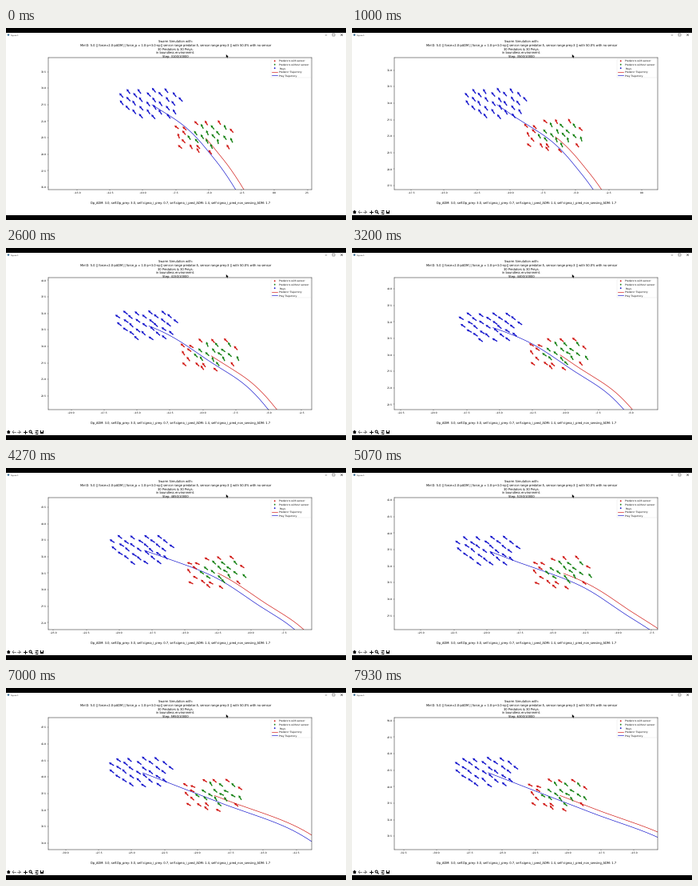
These frames come from a looping animation (426 by 240 pixels, 8000 ms). A matplotlib script:

```python
import numpy as np
import matplotlib.pyplot as plt
from matplotlib.animation import FuncAnimation
from matplotlib.patches import Circle, Polygon, Rectangle
from matplotlib.ticker import MultipleLocator

W, H, DPI = 426, 240, 96
PT = 72 / DPI                      # points per pixel
FRAMES, LOOP = 120, 8000
LAST = 64                          # simulation ticks in one loop
LAG, SIDE = 18.5, 0.6              # predators trail behind and to the right
START = -53
RED, GREEN, BLUE = "#d01410", "#128010", "#1212cc"

plt.rcParams["font.family"] = "DejaVu Sans"
plt.rcParams["text.hinting"] = "none"
rng = np.random.default_rng(7)

# Path of the prey centre: tick, x, y
TRACK = np.array([
    (START, -1.7, 10.6), (-28, -4.5, 19.1), (-10.5, -7.06, 24.57),
    (0, -9.3, 27.48), (16, -12.79, 31.93), (35, -18.09, 35.95),
    (LAST, -26.08, 42.12)])


def prey_at(k):
    """Smooth (Hermite) position along the track at ticks k."""
    t, p = TRACK[:, 0], TRACK[:, 1:]
    m = np.gradient(p, t, axis=0)
    i = np.clip(np.searchsorted(t, k, "right") - 1, 0, len(t) - 2)
    h = (t[i + 1] - t[i])[:, None]
    u = (k - t[i])[:, None] / h
    return ((2*u**3 - 3*u**2 + 1) * p[i] + (u**3 - 2*u**2 + u) * h * m[i]
            + (3*u**2 - 2*u**3) * p[i + 1] + (u**3 - u**2) * h * m[i + 1])


def course(k):
    d = prey_at(k + 0.5) - prey_at(k - 0.5)
    return np.arctan2(d[:, 1], d[:, 0])


def pred_at(k):
    a = course(k - LAG)
    return prey_at(k - LAG) + SIDE * np.column_stack([np.sin(a), -np.cos(a)])


def view_centre(k):
    x = -7.18 - 0.212*k - 0.0006*k**2 + 0.18*np.sin(2*np.pi*k/LAST)
    y = 24.63 + 0.289*k - 0.00065*k**2
    return x, y


def swarm(dx, dy, noise):
    """Thirty places of a hexagonal lattice, centred, slightly uneven."""
    grid = np.array([(dx * (c + 0.5 * (r % 2)), dy * r)
                     for r in range(-4, 5) for c in range(-4, 5)])
    near = grid[np.argsort(np.hypot(grid[:, 0] - 0.1, grid[:, 1] - 0.1))[:30]]
    return near - near.mean(axis=0) + rng.normal(0, noise, near.shape)


fig = plt.figure(figsize=(W / DPI, H / DPI), dpi=DPI, facecolor="white")


def layer():
    a = fig.add_axes([0, 0, 1, 1], xlim=(0, W), ylim=(H, 0))
    a.axis("off")
    return a


win = layer()


def label(x, y, s, size, ha="center", ax=win):
    return ax.text(x, y, s, fontsize=size * PT, ha=ha, va="baseline")


def stroke(xs, ys, lw=0.6, color="black", ax=win):
    return ax.plot(xs, ys, color=color, lw=lw * PT)[0]


def fill(shape, color="black", ax=win):
    shape.set(facecolor=color, linewidth=0)
    return ax.add_patch(shape)


# ---- window ----
for y in (0, 234):
    fill(Rectangle((0, y), W, 6))
fill(Circle((3, 8.6), 1.3), "#4a7a9c")
label(5.5, 9.6, "Figure 1", 2.4, "left")
stroke([399.5, 402], [8.6, 8.6], 0.4)
stroke([409.4, 411.8, 411.8, 409.4, 409.4], [7.4, 7.4, 9.8, 9.8, 7.4], 0.35)
stroke([419.4, 421.8], [7.4, 9.8], 0.4)
stroke([419.4, 421.8], [9.8, 7.4], 0.4)

TITLE = [
    "Swarm Simulation with:",
    "MinID: 5.0 || force=2.0-pADM || force_p = 1.0-p+3.0-np|| "
    "sensor range predator:5, sensor range prey:3 || "
    "with 50.0% with no sensor",
    "30 Predators & 30 Preys.",
    "in boundless environment.",
    "",
]
lines = [label(212.5, 18 + 4.7 * i, s, 3.67) for i, s in enumerate(TITLE)]
step_text = lines[-1]
label(219, 219.4,
      "Dp_ADM: 3.0, self.Dp_prey: 3.0, self.sigma_i_prey: 0.7, "
      "self.sigma_i_pred_ADM: 1.4, self.sigma_i_pred_non_sensing_ADM: 1.7",
      3.67)


def toolbar():
    y = 230
    parts = [fill(Polygon([(0.8, y), (3.2, y - 2.4), (5.6, y), (4.8, y),
                           (4.8, y + 2), (1.6, y + 2), (1.6, y)]))]
    for x, d in ((10, -1), (16, 1)):
        parts.append(stroke([x - 2, x + 2], [y, y], 0.8, "#666666"))
        parts.append(stroke([x + d * 0.4, x + d * 2, x + d * 0.4],
                            [y - 1.6, y, y + 1.6], 0.8, "#666666"))
    parts.append(stroke([21.7, 26.3], [y, y], 0.9))
    parts.append(stroke([24, 24], [y - 2.3, y + 2.3], 0.9))
    parts.append(win.add_patch(Circle((30.6, y - 0.5), 1.5, fill=False,
                                      ec="black", lw=0.9 * PT)))
    parts.append(stroke([31.7, 33.2], [y + 0.6, y + 2.2], 1))
    for i in range(3):
        yy, x = y - 1.6 + 1.6 * i, 37.5 + 0.8 * (-1) ** i
        parts.append(stroke([35.7, 40.3], [yy, yy], 0.5))
        parts.append(stroke([x, x + 1], [yy, yy], 1.1))
    parts.append(fill(Rectangle((43, y - 2), 4.2, 4)))
    parts.append(fill(Rectangle((44, y - 1.8), 2.2, 1.4), "white"))
    return parts


tools = toolbar()

# ---- plot ----
ax = fig.add_axes([53 / W, 38 / H, 330 / W, 165 / H])
ax.patch.set_alpha(0)
for axis in (ax.xaxis, ax.yaxis):
    axis.set_major_locator(MultipleLocator(2.5))
ax.tick_params(labelsize=3.08 * PT, length=1.2 * PT, width=0.4 * PT,
               pad=1.1 * PT)
for side in ax.spines.values():
    side.set_linewidth(0.45 * PT)

pred_line = stroke([], [], 0.65, RED, ax)
prey_line = stroke([], [], 0.65, BLUE, ax)


class Flock:
    def __init__(self, centre, lag, places, color, spread, length):
        n = len(places)
        self.centre, self.lag, self.places = centre, lag, places
        self.length = length
        self.tilt = rng.normal(0, spread, n)
        self.phase = rng.uniform(0, 2 * np.pi, n)
        self.sway = spread * 0.6
        zero = np.zeros(n)
        self.q = ax.quiver(zero, zero, zero - 5, zero + 5, color=color,
                           units="dots", scale_units="dots", angles="uv",
                           scale=1, width=1.35, headwidth=2.5, headlength=2.3,
                           headaxislength=2.1, pivot="tail", zorder=3)

    def move(self, k):
        wave = k / 9 + self.phase
        drift = 0.06 * np.column_stack([np.cos(wave), np.sin(wave)])
        self.q.set_offsets(self.centre(k) + self.places + drift)
        a = (course(k - 1 - self.lag) + self.tilt
             + self.sway * np.sin(k / 6 + self.phase))
        self.q.set_UVC(self.length * np.cos(a), self.length * np.sin(a))


# Predators without sensor keep to the middle of their group
group = swarm(0.92, 0.7, 0.12)
group = group[np.argsort(np.hypot(group[:, 0] - 0.5, group[:, 1]))]
flocks = [
    Flock(prey_at, 0, swarm(0.98, 0.64, 0.06), BLUE, 0.06, 7.4),
    Flock(pred_at, 6, group[15:], RED, 0.18, 6.8),
    Flock(pred_at, 6, group[:15], GREEN, 0.18, 6.8),
]

# ---- legend and pointer, above the plot ----
top = layer()
top.add_patch(Rectangle((331.5, 38.5), 50, 23.5, fc=(1, 1, 1, 0.8),
                        ec="#dddddd", lw=0.3 * PT))
LEGEND = [("Predators with sensor", RED, True),
          ("Predators without sensor", GREEN, True),
          ("Preys", BLUE, True),
          ("Predator Trajectory", RED, False),
          ("Prey Trajectory", BLUE, False)]
for i, (name, color, dot) in enumerate(LEGEND):
    y = 41.2 + 4.5 * i
    if dot:
        fill(Circle((336.7, y), 0.9), color, top)
    else:
        stroke([333.4, 340], [y, y], 0.65, color, top)
    label(342.3, y + 1.1, name, 3.0, "left", top)
fill(Polygon([(275.8, 33), (275.8, 37), (276.8, 36.2), (277.5, 37.6),
              (278.1, 37.2), (277.5, 36), (278.7, 35.8)]), ax=top)


def trail(line, centre, start, k):
    line.set_data(*centre(np.linspace(start, k, 240)).T)


def draw(frame):
    k = round(0.54 * frame)
    now = np.array([float(k)])
    step_text.set_text(f"Step: {3100 + 50 * k}/10000")
    for part in tools:
        part.set_visible(frame > 0)
    trail(prey_line, prey_at, START, k)
    trail(pred_line, pred_at, START + LAG, k)
    for flock in flocks:
        flock.move(now)
    x, y = view_centre(k)
    ax.set_xlim(x - 10, x + 10)
    ax.set_ylim(y - 10, y + 10)
    return []


anim = FuncAnimation(fig, draw, frames=FRAMES, interval=LOOP / FRAMES,
                     init_func=lambda: draw(0), repeat=True, repeat_delay=0,
                     blit=False)
plt.show()
```
